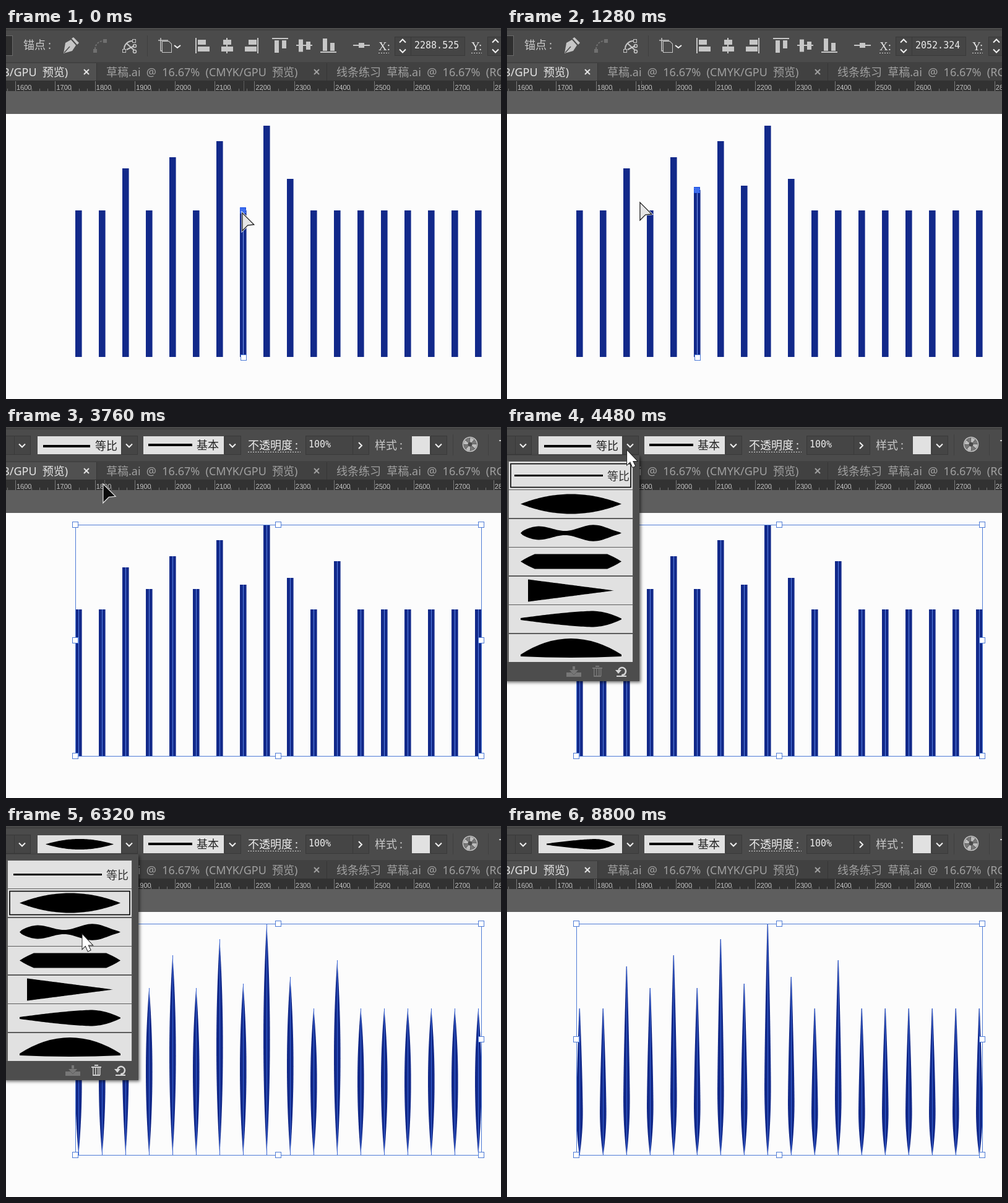
An HTML page with a canvas for the animation above (9360 ms loop, 800 by 600 pixels).

```html
<!DOCTYPE html>
<html lang="zh">
<head>
<meta charset="utf-8">
<title>Stroke profiles</title>
<style>
html, body { margin: 0; width: 100%; height: 100%; overflow: hidden; background: #fcfcfc; }
canvas { display: block; width: 800px; height: 600px; }
</style>
</head>
<body>
<canvas id="stage" width="800" height="600"></canvas>
<script>
const g = document.getElementById('stage').getContext('2d');
const LOOP = 9360, STEP = 80;
const CJK = '"Noto Sans CJK SC", "Noto Sans CJK", sans-serif';
const UI = '"Noto Sans", ' + CJK;
const NAVY = '#12298a', BLUE = '#4f7cd6', ICON = '#c6c6c6', PALE = '#e1e1e1', BAR = '#4b4b4b';
const BOTTOM = 532, BARS = 18;
const ALL_TOOL = 2640, SWEEP = 2800, SWEPT = 3200, OPEN = 4400, PICK = 6000, SHUT = 7760, GONE = 8800;
const PICK_GAP = 480, picks = [1, 2, 3, 5];
const raised = { 2: 227, 4: 209, 6: 183, 8: 158, 9: 244 };
const pulls = [
  { bar: 7, t: -240, rise: 40 }, { bar: 5, t: 640, rise: 33 },
  { bar: 3, t: 1440, rise: 33 }, { bar: 11, t: 2080, rise: 78 }
];

const barX = i => 117 + 38 * i;
const rowY = n => Math.round(78 + 46.45 * n);
const mix = (a, b, k) => a + (b - a) * k;
const clamp = (v, a, b) => Math.min(b, Math.max(a, v));
const smooth = k => k * k * (3 - 2 * k);

// Cursor keys: time, x, y
const path = [];
for (const { bar, t, rise } of pulls) {
  const x = barX(bar);
  if (bar === 3) path.push([1280, 215, 283]);
  path.push([t, x - 8, 261], [t + 80, x + 25, 318], [t + 160, x + 25, 318],
    [t + 240, x - 1, 300], [t + 480, x - 1, 300 - rise]);
}
path.push([SWEEP, 785, 500], [SWEPT, 80, 538], [3760, 157, 93], [4080, 199, 30], [OPEN, 199, 30]);
picks.forEach((p, n) => {
  const click = PICK + PICK_GAP * n, x = 126 - 3 * n, y = rowY(p) + 6 - 2 * n;
  path.push([n ? click - 320 : 4880, x, y], [click, x, y]);
});
path.push([SHUT, 199, 30], [8000, 199, 30], [8640, 139, 290]);

function cursorAt(t) {
  let n = path.findIndex(p => p[0] > t);
  if (n < 0) n = path.length;
  const a = path[n - 1], b = path[n] || a;
  const k = a === b ? 0 : smooth((t - a[0]) / (b[0] - a[0]));
  return { x: mix(a[1], b[1], k), y: mix(a[2], b[2], k) };
}

function topOf(i, t) {
  const p = pulls.find(p => p.bar === i);
  if (!p) return raised[i] || 295;
  return 295 - p.rise * smooth(clamp((t - p.t - 240) / 240, 0, 1));
}

// Half width along the stroke, 0..1
const profiles = [
  () => 1,
  t => 4 * t * (1 - t),
  t => Math.sqrt(4 * t * (1 - t)) * (0.71 + 0.44 * Math.cos(2 * Math.PI * (t - 0.75) / 0.62)),
  t => { const u = Math.min(1, t / 0.14, (1 - t) / 0.14); return u * (1.2 - 0.2 * u); },
  t => 1 - t,
  t => {
    if (t > 0.7) { const v = (1 - t) / 0.3; return 0.05 + 0.95 * v * (2 - v); }
    const u = t / 0.7;
    return 0.12 + 0.88 * u * (1.3 - 0.3 * u * u);
  }
];

function rect(x, y, w, h, fill, stroke) {
  if (fill) { g.fillStyle = fill; g.fillRect(x, y, w, h); }
  if (stroke) { g.strokeStyle = stroke; g.lineWidth = 1; g.strokeRect(x + 0.5, y + 0.5, w - 1, h - 1); }
}
function trace(pts) {
  g.beginPath();
  pts.forEach(p => g.lineTo(p[0], p[1]));
}
function line(pts, color, width = 1, dash = []) {
  trace(pts);
  g.strokeStyle = color; g.lineWidth = width;
  g.setLineDash(dash); g.stroke(); g.setLineDash([]);
}
function poly(pts, fill, stroke, width = 1) {
  trace(pts);
  g.closePath();
  if (stroke) { g.strokeStyle = stroke; g.lineWidth = width; g.stroke(); }
  if (fill) { g.fillStyle = fill; g.fill(); }
}
function ring(x, y, r, color, width, from = 0, to = 7) {
  g.beginPath(); g.arc(x, y, r, from, to);
  g.strokeStyle = color; g.lineWidth = width; g.stroke();
}
function text(s, x, y, color, size = 18, font = CJK) {
  g.font = size + 'px ' + font;
  g.fillStyle = color;
  g.fillText(s, x, y);
}
const digits = (s, x) => text(s, x, 33, '#ececec', 15, '"DejaVu Sans Mono", monospace');
function chevron(x, y, dy = 5) {
  line([[x - 5, y - dy / 2], [x, y + dy / 2], [x + 5, y - dy / 2]], '#f0f0f0', 2);
}
const field = (x, w) => rect(x, 14, w, 31, '#454545', '#393939');
function dropdown(x) {
  field(x - 13, 27);
  chevron(x, 30);
}
function underline(x, w) { line([[x, 40.5], [x + w, 40.5]], '#ddd', 1, [2, 2]); }

// Ribbon of varying width, along x or down y
function ribbon(f, x, y, len, half, color, down) {
  const a = [], b = [];
  for (let n = 0; n <= 50; n++) {
    const d = len * n / 50, h = f(n / 50) * half;
    a.push(down ? [x - h, y + d] : [x + d, y - h]);
    b.unshift(down ? [x + h, y + d] : [x + d, y + h]);
  }
  poly(a.concat(b), color);
}

function tab(s, x, color, cross) {
  g.wordSpacing = '4.6px';
  text(s, x, 78, color, 18, UI);
  g.wordSpacing = '0px';
  for (const d of [-4, 4]) line([[cross - d, 67], [cross + d, 75]], color, 2);
}

function backdrop(cur) {
  rect(0, 0, 800, 57, BAR);
  rect(0, 2, 800, 2, '#404040');
  rect(0, 55, 800, 30, '#414141');
  rect(0, 57, 146, 28, '#505050');
  for (const x of [146, 518]) rect(x, 57, 1, 28, '#363636');
  tab('B/GPU 预览)', -6, '#e4e4e4', 130);
  tab('草稿.ai @ 16.67% (CMYK/GPU 预览)', 162, '#a0a0a0', 502);
  tab('线条练习 草稿.ai @ 16.67% (RGB/GPU', 534, '#a0a0a0', 900);

  rect(0, 85, 800, 17, '#323232');
  for (let n = -1; n < 13; n++) {
    const x = 15 + 64.4 * n;
    rect(Math.round(x), 86, 1, 16, '#7c7c7c');
    for (let m = 1; m < 5; m++) rect(Math.round(x + 12.88 * m), 98, 1, 4, '#707070');
    text(1600 + 100 * n, x + 2, 100, '#c4c4c4', 11, '"Liberation Sans", sans-serif');
  }
  if (cur.y > 85) line([[cur.x + 2.5, 86], [cur.x + 2.5, 102]], '#8a8a8a', 1, [1, 1]);
  rect(0, 102, 800, 37, '#5e5e5e');
  rect(0, 139, 800, 461, '#fcfcfc');
}

function coordinate(s, x, value) {
  text(s, x, 36, '#e4e4e4', 19, '"Liberation Serif", serif');
  underline(x, 17);
  field(x + 26, 114);
  rect(x + 52, 14, 1, 31, '#393939');
  chevron(x + 39, 21, -5);
  chevron(x + 39, 37);
  digits(value, x + 58);
}

function alignIcons() {
  for (let n = 0; n < 3; n++) {
    rect(306 + 50 * n, 16, 2, 25, ICON);
    rect(430 + 39 * n, 16 + 11 * n, 26, 2, ICON);
    for (let j = 0; j < 2; j++) {
      const w = 13 + 6 * j, h = 20 - 7 * j;
      rect(310 + 47.5 * n - w * n / 2, 19 + 11 * j, w, 8, ICON);
      rect(434 + 39 * n + 12 * j, 20 + 8.5 * n - h * n / 2, 7, h, ICON);
    }
  }
}

function anchorBar(value) {
  rect(-5, 12, 16, 33, '#2f2f2f', '#6a6a6a');
  text('锚点 :', 28, 34, '#c8c8c8');
  // Pen
  poly([[93, 41], [96, 24], [105, 19], [113, 28], [107, 37]], ICON);
  poly([[106, 17], [109, 15], [118, 24], [115, 27]], ICON);
  line([[94, 40], [103, 30]], BAR, 1.5);
  // Curve
  for (const k of [0, 16]) rect(141 + k, 34 - k, 6, 6, '#707070');
  g.setLineDash([3, 2]);
  ring(157, 34, 13, '#707070', 2, Math.PI, Math.PI * 1.5);
  g.setLineDash([]);
  // Scissors
  for (const k of [0, 16]) rect(188 + k, 34 - k, 6, 6, null, ICON);
  ring(204, 34, 13, ICON, 2, Math.PI, Math.PI * 1.5);
  line([[195, 25], [207, 36]], ICON, 2);
  line([[195, 35], [207, 29]], ICON, 2);
  for (const y of [29, 38]) ring(208, y, 2.5, ICON, 1.5);
  rect(228, 12, 1, 34, '#404040');
  // Artboard
  line([[250, 16], [250, 37], [262, 37]], ICON, 1.5);
  line([[246, 20], [262, 20]], ICON, 1.5);
  poly([[253, 22], [263, 22], [267, 26], [267, 39], [253, 39]], BAR, ICON, 2);
  chevron(277, 30, 4);
  alignIcons();
  rect(561, 27, 27, 2, ICON);
  rect(570, 24, 9, 8, ICON);
  coordinate('X:', 602, value);
  coordinate('Y:', 752, '');
}

function strokeBar(p) {
  field(-5, 20);
  dropdown(26);
  rect(51, 15, 135, 29, PALE);
  dropdown(199);
  if (p) ribbon(profiles[p], 64, 29.5, 110, 8.5, '#000');
  else {
    rect(60, 29, 76, 4, '#000');
    text('等比', 144, 37, '#222');
  }
  rect(222, 15, 130, 29, PALE);
  dropdown(366);
  rect(230, 27, 71, 4, '#000');
  text('基本', 308, 36, '#222');
  text('不透明度 :', 391, 36, '#ececec');
  underline(391, 85);
  field(484, 103);
  rect(560, 14, 1, 31, '#393939');
  digits('100%', 489);
  line([[570, 25], [575, 30], [570, 35]], '#f0f0f0', 2);
  text('样式 :', 596, 36, '#c8c8c8');
  rect(656, 15, 29, 29, PALE);
  dropdown(699);
  for (const x of [722, 779]) rect(x, 12, 1, 34, '#404040');
  // Color wheel
  for (let n = 0; n < 8; n++) ring(750, 28, 7, n % 2 ? '#777' : '#bdbdbd', 7, n * Math.PI / 4, (n + 0.9) * Math.PI / 4);
  ring(750, 28, 11.5, ICON, 1.5);
  rect(797, 21, 3, 2, ICON);
}

const handle = (x, y) => rect(x - 5, y - 5, 10, 10, '#fff', BLUE);

function drawBars(t, p, picked, all) {
  for (let i = 0; i < BARS; i++) {
    const x = barX(i), y = topOf(i, t), h = BOTTOM - y;
    ribbon(profiles[p], x + 0.3, y, h, 5.3, NAVY, true);
    if (all) rect(x, y, 1, h, p ? '#3a66d6' : '#5a82e2');
    if (i === picked) {
      rect(x, y, 1, h, '#7d9df0');
      rect(x - 5, y - 5, 10, 10, '#2458e6');
      for (let n = 0; n < 16; n++) rect(x - 4 + 2 * (n % 4) + (n >> 2) % 2, y - 3 + 2 * (n >> 2), 1, 1, '#8fb0ff');
      handle(x + 1, BOTTOM + 1);
    }
  }
  if (!all) return;
  rect(112, 158, 657, 375, null, BLUE);
  for (const x of [112, 440, 768])
    for (const y of [158, 345, 532])
      if (x !== 440 || y !== 345) handle(x, y);
}

function menu(p) {
  g.save();
  g.shadowColor = 'rgba(0,0,0,.6)'; g.shadowBlur = 5; g.shadowOffsetX = g.shadowOffsetY = 2;
  rect(-4, 46, 218, 365, '#4d4d4d');
  g.restore();
  rect(0, 55, 204, 325, '#5c5c5c');
  for (let n = 0; n < 7; n++) rect(3, rowY(n) - 22, 200, 45, PALE);
  rect(12, 77, 143, 3, '#000');
  text('等比', 162, 86, '#333');
  [16, 13, 12, 18, 13].forEach((half, n) => {
    const inset = n === 3 ? 12 : 0;
    ribbon(profiles[n + 1], 22 + inset, rowY(n + 1) + 0.5, 163 - 2 * inset, half, '#000');
  });
  // Dome
  g.beginPath();
  g.moveTo(22, 368);
  g.quadraticCurveTo(103, 316, 185, 368);
  g.lineTo(185, 371);
  g.quadraticCurveTo(103, 375, 22, 371);
  g.fillStyle = '#000'; g.fill();
  g.strokeStyle = '#000'; g.lineWidth = 1.6;
  g.strokeRect(6, rowY(p) - 18.5, 194, 38);
  // Footer icons
  rect(96, 397, 24, 7, '#777');
  rect(106, 387, 4, 7, '#777');
  poly([[101, 393], [115, 393], [108, 401]], '#777', '#4d4d4d');
  const bin = p ? '#cfcfcf' : '#777';
  rect(138, 389, 16, 2, bin);
  rect(143, 386, 6, 2, bin);
  for (const x of [140, 144, 148, 151]) rect(x, 391, 1.5, 12, bin);
  rect(140, 402, 12, 2, bin);
  ring(186, 395, 6, '#d6d6d6', 2.5, -2.8, 1.7);
  poly([[175, 393], [185, 393], [180, 399]], '#d6d6d6');
  rect(177, 402, 16, 2, '#d6d6d6');
}

function tooltip() {
  rect(144, 133, 137, 29, 'rgba(0,0,0,.35)');
  rect(141, 130, 137, 29, '#fff', '#777');
  text('宽度配置文件 1', 147, 151, '#575757');
}

function pointer(kind, { x, y }) {
  g.save();
  g.translate(x + 0.5, y + 0.5);
  const head = [[0, 0], [17, 17], [8, 18], [0, 26]];
  if (kind === 'direct') {
    poly(head, null, '#fff', 4);
    poly(head, '#e6e6e6', '#111', 2.4);
  } else if (kind === 'select') {
    g.scale(1.07, 1.07);
    poly(head, '#0c0c0c', '#ddd', 2.4);
  } else poly([[0, 0], [0, 23], [5, 18], [9, 27], [13, 25], [9, 17], [16, 17]], '#fff', '#222', 2);
  g.restore();
}

function marquee(t, cur, press, release) {
  const from = cursorAt(press), age = t - press;
  if (age >= 0 && age < 240) {
    g.globalAlpha = 1 - age / 400;
    ring(from.x + 5, from.y - 8, 11, 'rgba(240,205,235,.5)', 7);
    ring(from.x, from.y - 1, 12, '#fbdcae', 6);
    g.globalAlpha = 1;
  }
  if (age > 0 && t < release) {
    const x = Math.round(from.x) - 1.5, y = Math.round(from.y) + 0.5;
    const r = Math.round(cur.x) - 1.5, b = Math.round(cur.y) - 1.5;
    line([[x, y], [r, y], [r, b], [x, b], [x, y]], '#333', 1, [1, 2]);
  }
}

function draw(t) {
  const cur = cursorAt(t);
  const open = t >= OPEN && t < SHUT;
  const last = pulls.filter(p => t >= p.t + 160).pop().bar;
  const shown = t < STEP ? 9 : last;
  const p = t < PICK ? 0 : picks[Math.min(3, Math.floor((t - PICK) / PICK_GAP))];
  backdrop(cur);
  if (t < ALL_TOOL) anchorBar((1934.223 + 59.0503 * (shown - 3)).toFixed(3));
  else strokeBar(p);
  drawBars(t, p, t < SWEEP ? last : -1, t >= SWEPT);
  if (open) menu(p);
  if (t >= 5440 && t < PICK) tooltip();
  for (const q of pulls) if (q.t > 0) marquee(t, cur, q.t, q.t + 160);
  marquee(t, cur, SWEEP, SWEPT);
  if (t < GONE) pointer(open ? 'arrow' : t < ALL_TOOL ? 'direct' : 'select', cur);
}

function tick() {
  draw(Math.floor(performance.now() % LOOP / STEP) * STEP);
  requestAnimationFrame(tick);
}
tick();
</script>
</body>
</html>
```
